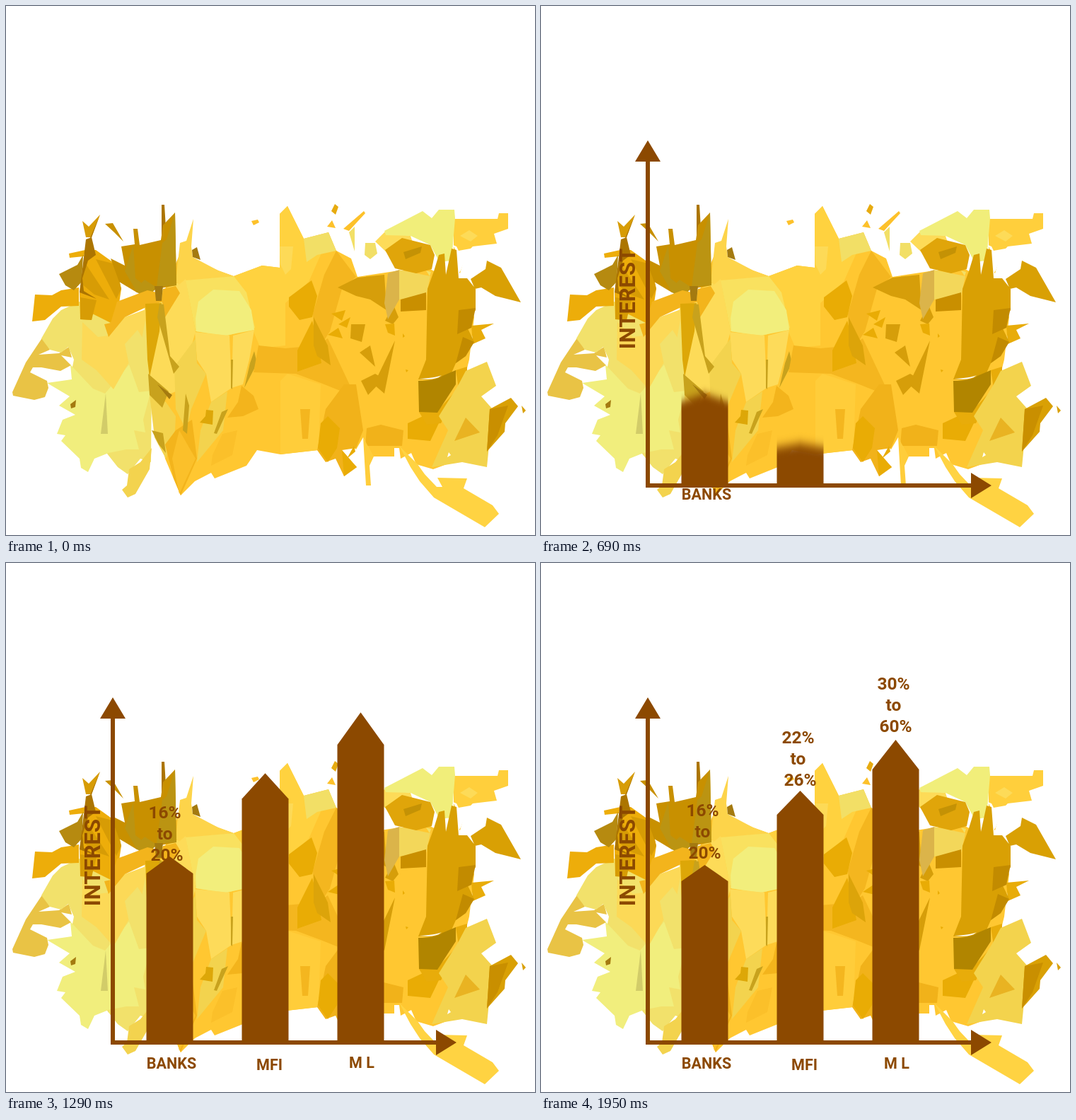
An HTML page that plays this animation: 748 px wide and 748 px high, repeating every 4.53 s.

```html
<!DOCTYPE html>
<html lang="en">
<head>
<meta charset="utf-8">
<title>Interest rates</title>
<style>
html,body{margin:0;width:100%;height:100%;overflow:hidden;background:#fff}
svg{display:block;width:100vw;height:100vh}
text{font:700 21.5px Roboto,"Liberation Sans",sans-serif;text-anchor:middle}
.rate text{font-size:24.5px}
</style>
</head>
<body>
<svg viewBox="0 0 748 748">
<defs>
<clipPath id="aboveAxis"><path d="M0 0H748V680H0z"/></clipPath>
<clipPath id="belowAxis"><path d="M0 675H748V748H0z"/></clipPath>
<clipPath id="leftOfAxis"><path d="M0 0H148V748H0z"/></clipPath>
</defs>

<g id="paint">
<!-- ground tones -->
<path fill="#ffc731" d="M225 400L246 350 300 374 322 382 362 367 387 370V294L398 283 421 329 456 320 467 346 488 357 497 383 556 374 600 372 650 400 662 440 655 500 640 560 680 572 677 651 645 640 604 655 580 648 573 632 558 640 556 625 549 625V637H519L505 610 495 627 480 615 440 628 388 634 355 628 340 650 295 668 290 660 267 672 247 692 225 640 205 545z"/>
<path fill="#e9c345" d="M9 546L28 504 52 468 62 486 46 493 75 491 89 482 93 497 78 494 92 508 77 516 50 511 38 511 34 518 58 530 60 540 55 553 40 557 10 551z"/>
<path fill="#f2e16b" d="M50 470L66 442 78 430 104 418 150 445 202 430 206 520 205 645 190 640 172 662 158 652 143 633 130 560 93 515 96 500 88 482 78 490 62 486z"/>
<path fill="#f1ee7d" d="M91 507L123 541 140 548 174 507 190 530 188 546 205 544 194 585 197 603 181 600 188 627 170 627 145 632 125 640 116 659 106 653 104 640 78 615 84 607 72 605 80 585 98 578 75 565 90 552 58 533 93 528z"/>
<path fill="#fcd957" d="M108 447L130 468 145 466 168 440 200 428 190 482 172 507 152 542 128 515 107 500z"/>
<path fill="#f2e16b" d="M168 478L186 458 200 480 203 520 188 546 174 507z"/>
<path fill="#fddb58" d="M195 415L245 390 240 545 205 560z"/>
<path fill="#fdd44a" d="M240 390L243 362 246 335 255 332 265 301 262 340 264 355 300 374 322 382 270 388 254 400z"/>
<path fill="#ffd23f" d="M322 382L362 367 387 370V294L398 283 421 329 448 345 428 390 395 420V480L360 484 351 463 347 430 330 395z"/>
<path fill="#ffcd3a" d="M388 530L398 520 445 535 442 628 388 634z"/>
<path fill="#fddb58" d="M222 420L240 398 254 386 268 460 260 490 238 510z"/>
<path fill="#f9e15f" d="M254 388L322 382 340 405 352 455 310 467 268 460z"/>
<path fill="#f2ee7c" d="M268 442L272 418 293 401 330 403 347 430 351 458 310 466 269 460z"/>
<path fill="#fddb5a" d="M267 461L316 466 319 540 290 560 283 520 270 500zM321 466L351 458 344 500 335 535 319 540z"/>
<path fill="#f3d34e" d="M238 510L268 470 270 505 283 520 262 570 255 600 240 570zM203 550L226 560 240 580 239 600 226 640 210 610zM290 560L313 545 307 600 270 645 275 600zM206 625L203 655 183 690 172 695 164 684 171 678 174 655 190 645z"/>

<!-- left foliage -->
<path fill="#edad0a" d="M37 446L41 408 65 409 78 402 103 398V424L78 425 55 444zM89 350L112 345 110 354 90 356zM104 405L113 345 127 345 155 365 163 400 157 440 148 448 122 435 121 444 105 443z"/>
<path fill="#b68a10" d="M75 379L101 366 109 352 107 390 96 402 84 395z"/>
<path fill="#d79c05" d="M108 304L117 312 133 295 121 327H113zM127 358L155 365 163 400 156 414zM111 362L146 415 125 408 106 392zM105 412L128 416 121 444 105 443z"/>
<path fill="#ac7500" d="M104 405L113 330 121 327 127 352 116 360 108 385 110 403 128 414zM119 328L133 295 121 327zM220 281H224L227 330 220 365z"/>
<path fill="#c89000" d="M148 357L168 367 163 340 182 337 180 315H186L189 338 219 331 222 310 239 292 241 395 213 400 196 408 185 405 160 390zM140 308L151 307 166 333 153 320z"/>
<path fill="#bb9412" d="M221 335L227 330 239 292 241 395 213 397zM180 338L183 385 200 398 196 408 185 405 168 375zM183 400L196 387 213 398 196 418z"/>
<path fill="#f3b41c" d="M148 448L157 418 200 402 213 405 222 418 200 425 168 440 145 468 139 450zM222 400L240 396 246 406 225 440 220 415zM225 620L240 600 263 585 270 640 247 692 237 668zM333 537L350 551 357 570 335 580 313 582 328 560z"/>
<path fill="#dda708" d="M197 421L220 420 217 460 203 525 200 500zM274 589L282 580 283 571 293 572 292 592z"/>
<path fill="#c8a21d" d="M217 421L223 422 232 495 245 510 237 520 214 440zM201 520L230 545 221 568 203 550zM254 548L259 565 256 605 250 600zM206 600L222 604 226 632 216 620zM351 488L355 505 337 540 345 505zM318 500L321 500 320 542 318 540zM305 574L314 570 298 605 294 604z"/>
<path fill="#a47a10" d="M210 396L222 396 220 417 212 417zM214 535L235 550 231 556zM91 563L99 557 98 567 92 569zM263 345L270 341 275 359 264 355z"/>
<path fill="#d2cc69" d="M141 548L144 605H134z"/>
<path fill="#fbc02a" d="M245 690L235 640 245 600 268 640zM292 635L306 605 327 600 320 635 290 650z"/>

<!-- centre -->
<path fill="#f4b61f" d="M350 518L357 480 395 484 440 480 455 470 488 540 475 545 445 533 410 520zM436 478L434 435 450 380 467 346 495 383 475 400 458 460 445 480zM416 570H430L427 612H419z"/>
<path fill="#e9ac05" d="M400 412L432 388 440 410 433 440 415 444 400 425zM412 487L433 445 440 470 446 505 412 517z"/>
<path fill="#dca40a" d="M435 440L455 480 459 508 440 495 435 480z"/>
<path fill="#fdda57" d="M387 340H406L403 372 395 380 388 365z"/>
<path fill="#f2df66" d="M421 329L456 320 467 346 440 352 425 362zM508 335H522L525 350 515 358 507 352zM485 320L493 312V347zM594 374L601 376 599 382z"/>
<path fill="#f1b21a" d="M440 628L452 570 478 535 495 535 505 600 495 625 475 628 496 652 478 665 466 640 452 645zM510 597L530 592 562 600 560 622H508z"/>
<path fill="#e9ac05" d="M441 625L445 590 455 580 472 597 468 625 455 645zM475 628L492 648 496 652 478 665zM482 640L492 622 494 630zM568 590L600 575 612 590 600 615 568 612z"/>
<path fill="#ffcd3b" d="M505 610L520 637 514 650 516 678 509 678z"/>
<path fill="#d69e0a" d="M469 398L497 384 535 380 538 430 515 415 495 410zM488 450L508 450 503 475 487 470zM550 473L535 548 520 535zM500 490L515 480 522 510zM502 530L522 520 534 527 512 550zM548 423L555 440 547 450 536 445z"/>
<path fill="#e9ac05" d="M460 435L480 430 475 445zM455 465L470 455 476 470zM470 450L487 440 482 455zM536 450L549 449 550 466 540 462zM565 514l4 1-3 3zM561 463l3 4-3 2z"/>
<path fill="#dbb44a" d="M540 378L556 373V415L540 443 535 420z"/>
<path fill="#f3d75a" d="M556 373L600 382 594 410 556 415z"/>
<path fill="#c98f00" d="M558 415L594 405V430L558 432z"/>

<!-- upper right -->
<path fill="#ffcf3c" d="M633 301H695L697 293H710V315L690 322 694 336 660 340 650 350 642 378 636 372 633 350z"/>
<path fill="#fff" d="M632 338L637 340 640 346 668 341 652 350 643 374 638 380 636 346z"/>
<path fill="#fddb58" d="M522 333L535 320 572 325 580 350 540 350zM642 325L655 317 667 325 657 333z"/>
<path fill="#f1ee7a" d="M535 318L589 290 602 300 612 288H634L635 300 630 360 613 362 600 338 572 325 537 324z"/>
<path fill="#e0a50a" d="M536 345L560 328 600 338 606 352 602 372 580 378 550 371z"/>
<path fill="#c49205" d="M562 348L588 340 586 349 565 358z"/>
<path fill="#fdc12a" d="M477 315L506 290 508 293 485 318zM454 312L461 303 466 314zM347 304L356 302 358 306 350 310z"/>
<path fill="#e7ab10" d="M460 290L465 280 470 284 466 295z"/>

<!-- trunk and lower right -->
<path fill="#e8ac0a" d="M658 452L690 449 672 458 678 470 660 478zM612 570L640 540 636 515 652 510 652 525 635 550 615 590 595 592 584 574z"/>
<path fill="#d9a004" d="M594 500L596 400 605 375 612 352 620 350 622 380 630 343 637 345 640 385 652 385 664 400 664 430 650 450 662 475 650 495 636 505 625 530 583 528zM657 386L678 372 680 360 700 370 728 419 692 410 672 398 663 400z"/>
<path fill="#c28b00" d="M640 430L664 427 658 455 638 464zM636 505L646 468 662 475 650 495z"/>
<path fill="#b18500" d="M583 530Q608 530 617 523L636 515 636 535 610 575 584 574z"/>
<path fill="#f3d34d" d="M640 535L650 516 680 503 693 537 672 552 688 570 680 652 645 645 602 652 625 600 612 580z"/>
<path fill="#d9a004" d="M684 570L714 554 724 566 706 590 705 602 680 630zM729 565L735 572 731 576z"/>
<path fill="#c98f00" d="M684 570L710 565 695 607 680 630z"/>
<path fill="#e9b322" d="M634 615L650 582 670 603z"/>
<path fill="#ffd342" d="M556 622L582 648 592 662 609 680 617 680 610 667 652 668 647 682 688 706 697 718 677 737 605 695 585 672 572 652z"/>
<path fill="#fff" d="M626 631L629 635 624 638zM584 527Q608 530 616 522 608 526 584 527z"/>
</g>

<g fill="#8c4900">
<g id="bars" clip-path="url(#aboveAxis)"></g>
<path id="yAxis" d="M148-1V460H133L151 490 169 460H154V-1z"/>
<path id="xAxis" d="M-3 675H457V660L486 678 457 696V681H-3z"/>
<g clip-path="url(#leftOfAxis)"><text id="interest" style="font-size:31px">INTEREST</text></g>
<g id="labels" clip-path="url(#belowAxis)"></g>
<g id="rates"></g>
</g>
</svg>
<script>
const LOOP = 4530, STEP = 30, FLOOR = 678;
const $ = id => document.getElementById(id);

// [time, value] steps
const GROW = [[0,0],[35,.168],[95,.43],[110,.52],[185,.713],[260,.912],[335,1],
  [425,1.073],[500,1.1],[613,1.076],[755,1.035],[845,1.006],[920,1]];
const DROP = [[0,-40],[60,-27],[110,-17],[200,-8],[260,-3.5],[450,0]];
const SLIDE = [[240,38],[330,18],[390,5],[450,-14],[540,0]];
const ARRIVE = [[0,1],[90,.3],[180,.1],[300,0]];

const columns = [
  {x:231.5, apex:427, shoulder:450, start:580, name:'BANKS', nameX:234, nameY:715, nameStart:580,
   from:'16%', to:'20%', rateX:228.5, rateY:358, rateStart:1110, shift:[-39,30]},
  {x:366.5, apex:322, shoulder:356, start:655, name:'MFI', nameX:372.5, nameY:717, nameStart:780,
   from:'22%', to:'26%', rateX:363.5, rateY:254.5, rateStart:1320, shift:[30,40]},
  {x:501.5, apex:250, shoulder:292, start:745, name:'M L', nameX:503, nameY:715, nameStart:880,
   from:'30%', to:'60%', rateX:498.5, rateY:179, rateStart:1530, shift:[30,40]}
];

function add(parent, tag, attrs, text = '') {
  const el = document.createElementNS('http://www.w3.org/2000/svg', tag);
  for (const key in attrs) el.setAttribute(key, attrs[key]);
  el.textContent = text;
  return parent.appendChild(el);
}

function sample(table, t) {
  if (t <= table[0][0]) return table[0][1];
  const i = table.findIndex(([time]) => time > t);
  if (i < 0) return table[table.length - 1][1];
  const [t0, a] = table[i - 1], [t1, b] = table[i];
  return a + (b - a) * (t - t0) / (t1 - t0);
}

const fade = (age, time) => Math.max(0, Math.min(1, age / time));

columns.forEach((c, i) => {
  const filter = add(document.querySelector('defs'), 'filter', {id:'blur' + i,
    filterUnits:'userSpaceOnUse', x:0, y:0, width:748, height:748, 'color-interpolation-filters':'sRGB'});
  c.blur = add(filter, 'feGaussianBlur', {stdDeviation:'0 0'});
  c.bar = add($('bars'), 'path', {});
  c.label = add($('labels'), 'text', {x:c.nameX, y:c.nameY}, c.name);
  c.rate = add($('rates'), 'g', {class:'rate'});
  add(c.rate, 'text', {x:c.rateX, y:c.rateY}, c.from);
  add(c.rate, 'text', {x:c.rateX, y:c.rateY + 30}, 'to');
  add(c.rate, 'text', {x:c.rateX + 3, y:c.rateY + 60}, c.to);
});

function drawColumn(c, i, t) {
  const age = t - c.start, scale = sample(GROW, age);
  const top = FLOOR - (FLOOR - c.apex) * scale;
  const side = FLOOR - (FLOOR - c.shoulder) * scale;
  c.bar.setAttribute('d', `M${c.x - 33} 740V${side}L${c.x} ${top} ${c.x + 33} ${side}V740z`);
  c.bar.style.display = scale > 0 ? '' : 'none';

  const speed = Math.abs(scale - sample(GROW, age - 15)) / 15 * (FLOOR - c.apex);
  const spread = speed * 4;
  c.blur.setAttribute('stdDeviation', `0 ${spread.toFixed(2)}`);
  if (spread > .4) c.bar.setAttribute('filter', `url(#blur${i})`);
  else c.bar.removeAttribute('filter');

  const nameAge = t - c.nameStart;
  c.label.setAttribute('transform', `translate(0 ${sample(DROP, nameAge)})`);
  c.label.setAttribute('opacity', fade(nameAge, 90));

  const rateAge = t - c.rateStart, away = sample(ARRIVE, rateAge);
  c.rate.setAttribute('transform', `translate(${c.shift[0] * away} ${c.shift[1] * away})`);
  c.rate.setAttribute('opacity', fade(rateAge, 150));
}

function draw(t) {
  const axis = sample(GROW, (t - 30) / .587);
  $('yAxis').setAttribute('transform', `translate(0 680) scale(1 ${-axis})`);
  $('xAxis').setAttribute('transform', `translate(151 0) scale(${axis} 1)`);
  for (const id of ['xAxis', 'yAxis']) $(id).style.display = axis > 0 ? '' : 'none';
  $('interest').setAttribute('transform', `translate(${133 + sample(SLIDE, t)} 414) rotate(-90)`);
  $('interest').setAttribute('opacity', fade(t - 240, 150));
  columns.forEach((c, i) => drawColumn(c, i, t));
}

const begin = performance.now();
function tick() {
  const t = (performance.now() - begin) % LOOP;
  draw(Math.floor(t / STEP) * STEP);
  requestAnimationFrame(tick);
}
tick();
</script>
</body>
</html>
```
